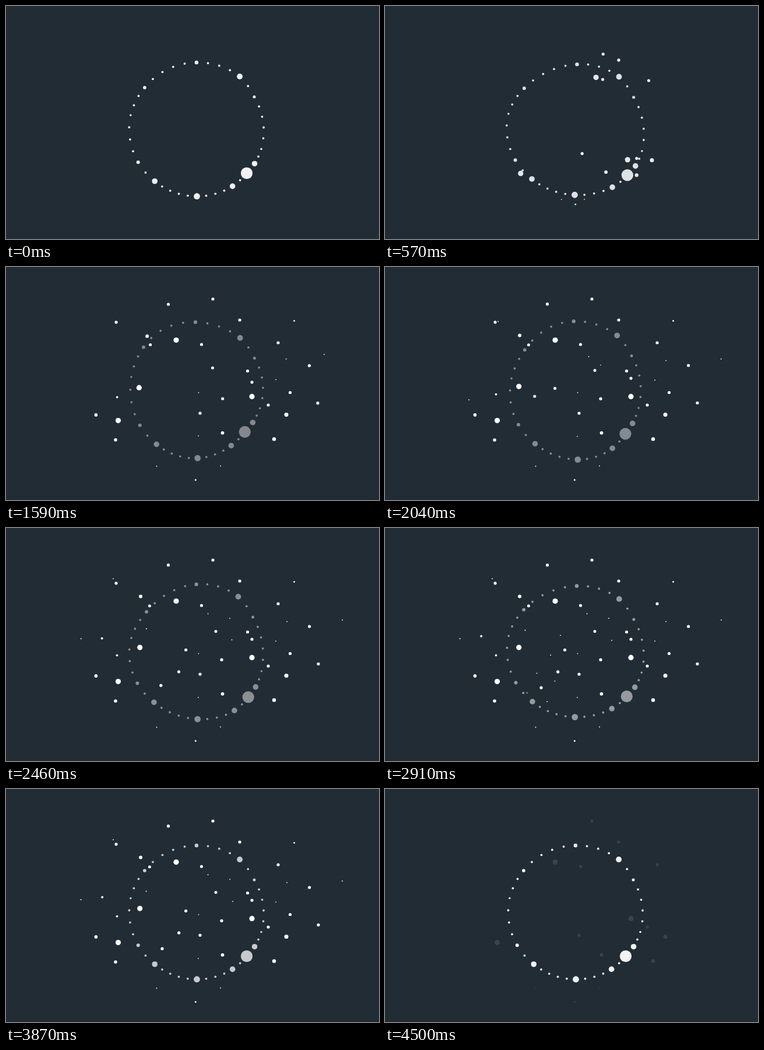
An HTML page with a canvas that plays this animation: 640 px wide and 400 px high, repeating every 4.53 s.

```html
<!DOCTYPE html>
<html lang="en">
<head>
<meta charset="utf-8">
<title>Particle ring</title>
<style>
html, body { margin: 0; width: 100%; height: 100%; overflow: hidden; background: #222c35; }
canvas { display: block; width: 640px; height: 400px; }
</style>
</head>
<body>
<canvas id="stage" width="640" height="400"></canvas>
<script>
const LOOP = 4530, STEP = 30, FADE = 270;
const CX = 326.5, CY = 211.8;
const ctx = document.getElementById('stage').getContext('2d');

const clamp = v => Math.max(0, Math.min(1, v));
const mix = (a, b, p) => a + (b - a) * p;
const span = (t, from, to) => clamp((t - from) / (to - from));
const easeOut = u => 1 - (1 - u) ** 3;
const smooth = u => u * u * (3 - 2 * u);

// Degrees run clockwise from straight up
function polar(x, y, deg, dist) {
  const a = deg * Math.PI / 180;
  return [x + dist * Math.sin(a), y - dist * Math.cos(a)];
}

// Ring landmarks: index, angle, distance, size; small dots fill the gaps evenly
const marks = [
  [0, .2, 114.8, 3.2], [4, 39.4, 117.5, 4.9], [6, 60.7, 114.1, 2.5],
  [11, 106.8, 116.5, 1.8], [13, 120.5, 116.1, 4.8], [14, 131, 114.6, 10.1],
  [16, 147.5, 115.7, 4.8], [20, 179.5, 114.9, 5.4], [25, 218.7, 114, 4.8],
  [27, 240.5, 114.6, 3], [31, 282.2, 115.3, 1.8], [34, 309, 114, 2.9],
  [39, 360.2, 114.8, 3.2]
];
const ring = [];
for (let m = 0; m < marks.length - 1; m++) {
  const [from, a0, d0, size] = marks[m], [to, a1, d1] = marks[m + 1];
  for (let i = from; i < to; i++) {
    const p = (i - from) / (to - from);
    const [x, y] = polar(CX, CY, mix(a0, a1, p), mix(d0, d1, p));
    ring.push({ x, y, r: i === from ? size : 1.9 });
  }
}

// A dot may emit further dots; spread is the time between its first and last
const dot = (x, y, r = 2.6) => ({ x, y, r, spread: 0, kids: [] });
const emitter = (x, y, r, spread, kids) => ({ x, y, r, spread, kids });

// Emitter whose dots leave at equal turns
function fan(x, y, r, n, heading, turn, reach, make = dot) {
  const kids = Array.from({ length: n }, (_, k) =>
    make(...polar(x, y, heading + turn * k, reach), k));
  return emitter(x, y, r, 290, kids);
}
const speck = (x, y) => dot(x, y, .9);
const cluster = (x, y, k) => fan(x, y, 2.6, [2, 0, 4][k], -17, -93, 26, speck);

const sources = [
  emitter(ring[4].x, ring[4].y, 0, 235, [
    dot(401, 91),
    emitter(467, 130, 2.6, 560, [
      dot(494.5, 92.5, 1.4), speck(463, 194.2), speck(482, 160.7), speck(577, 158)
    ]),
    dot(355, 55),
    dot(335.5, 133),
    emitter(292, 125.5, 4.6, 480, [
      dot(189, 94.8),
      dot(278.5, 63.7),
      fan(246.4, 133.8, 2.5, 2, 118, 70, 42),
      fan(360, 177.4, 2.5, 3, -24, 71, 33, speck),
      fan(231, 117.4, 3, 1, -57, 0, 56, speck)
    ])
  ]),
  emitter(ring[14].x, ring[14].y, 0, 235, [
    emitter(333, 251, 2.6, 230, [speck(330.5, 215.6), speck(330, 290.8)]),
    dot(371.5, 284.8, 2.9),
    emitter(481, 253.5, 3.5, 215, [dot(487.5, 215.5), dot(520.6, 169), dot(536, 233.3)]),
    dot(450, 237),
    dot(460, 295.4, 3.2),
    emitter(422, 222.4, 4.6, 510, [dot(414.5, 178.5), dot(370, 226.2), dot(422, 191)])
  ]),
  emitter(ring[20].x, ring[20].y, 0, 0, [
    speck(258.5, 342), speck(368, 341.5), dot(325.3, 365.6, 1.5)
  ]),
  emitter(ring[25].x, ring[25].y, 0, 0, [
    emitter(192.5, 263.6, 4.6, 400, [
      fan(154.4, 253.9, 2.8, 3, -53, 31, 69),
      dot(188, 297, 2.8),
      fan(229.7, 205.1, 4.6, 3, 93, 29, 79, cluster),
      dot(190.5, 218.6, 1.9)
    ])
  ])
];

// When each generation leaves (q runs 0..1 over siblings), travels and fades
const generations = [
  { start: (q, spread) => 500 - spread * (1 - q) ** 2, travel: 510, end: 4530 },
  { start: (q, spread) => 720 + spread * q, travel: 900, end: 4350 },
  { start: (q, spread) => 1800 + spread * q, travel: 600, end: 4170 },
  { start: () => 2480, travel: 420, end: 3810 }
];

function disc(x, y, r, alpha) {
  ctx.globalAlpha = alpha;
  ctx.beginPath();
  ctx.arc(x, y, r, 0, 2 * Math.PI);
  ctx.fill();
}

// Transverse wave crossing the ring diagonally
function drawRing(t) {
  const nx = .77, ny = -.64, length = 320;
  const amp = 5.1 * smooth(span(t, 210, 600)) * (1 - smooth(span(t, 2460, 3700)));
  const zero = -38 + (t - 570) * length / (LOOP / 2);
  const dim = smooth(span(t, 250, 1500)) - span(t, 1700, 4400) ** 2.2;
  for (const { x, y, r } of ring) {
    const s = (x - CX) * nx + (y - CY) * ny;
    const d = amp * Math.sin(2 * Math.PI * (s - zero) / length);
    disc(x - d * ny, y + d * nx, r, .94 - .5 * dim);
  }
}

function drawBurst(parent, px, py, depth, t) {
  const { kids, spread } = parent;
  kids.forEach((kid, k) => {
    const { start, travel, end } = generations[depth];
    const age = t - start(k / Math.max(1, kids.length - 1), spread);
    if (age <= 0) return;
    const p = easeOut(clamp(age / travel));
    const x = mix(px, kid.x, p), y = mix(py, kid.y, p);
    disc(x, y, kid.r, mix(.86, 1, clamp(age / 400)) * clamp((end - t) / FADE));
    drawBurst(kid, x, y, depth + 1, t);
  });
}

function draw(now) {
  const t = Math.floor(now % LOOP / STEP) * STEP;
  ctx.globalAlpha = 1;
  ctx.fillStyle = '#222c35';
  ctx.fillRect(0, 0, 640, 400);
  ctx.fillStyle = '#fff';
  drawRing(t);
  for (const source of sources) drawBurst(source, source.x, source.y, 0, t);
}

const began = performance.now();
function tick() {
  draw(performance.now() - began);
  requestAnimationFrame(tick);
}
tick();
</script>
</body>
</html>
```
